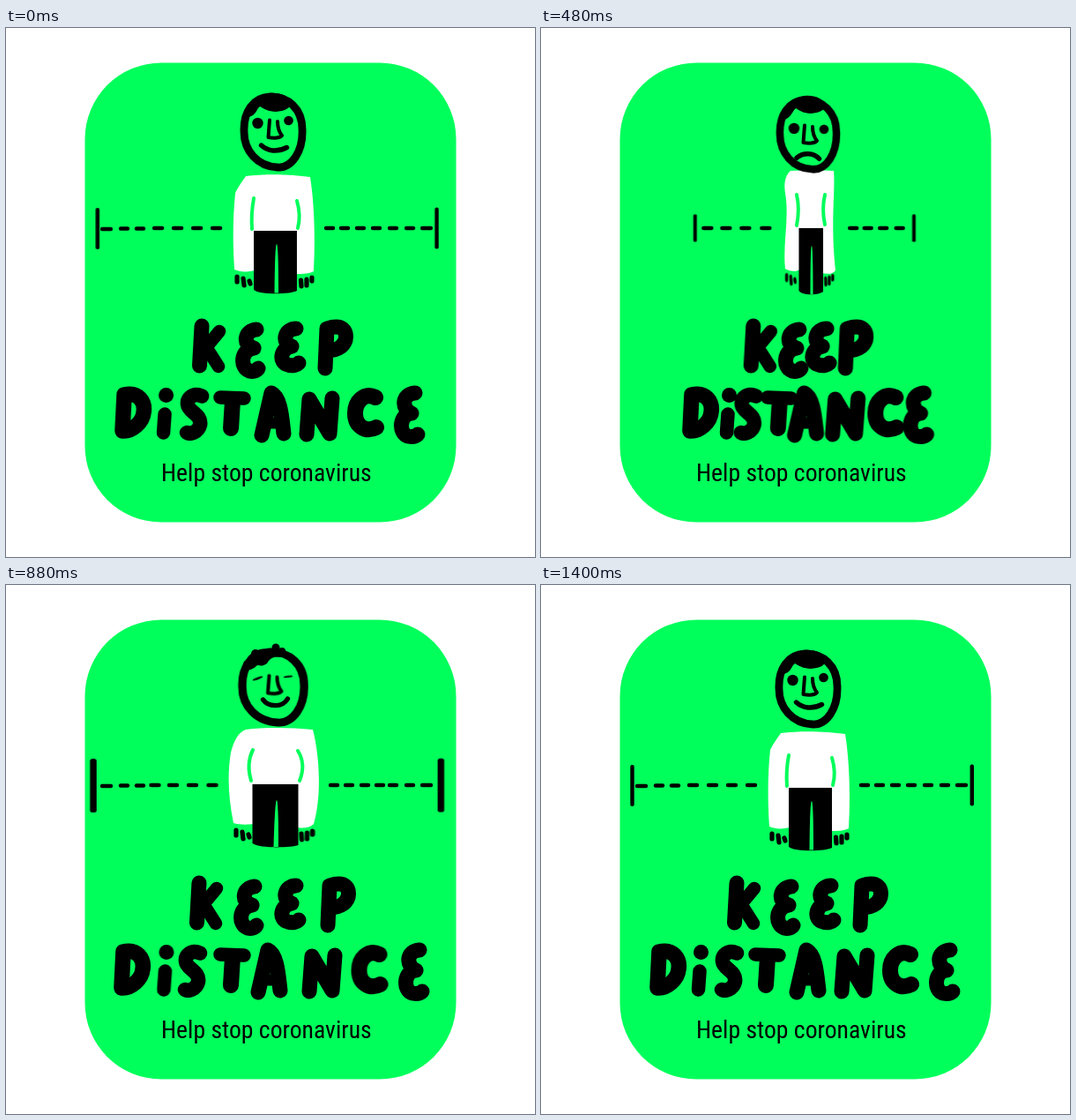
Recreate the animation shown at these times as an HTML page. Size 600x600 px, loop 1440 ms.

```html
<!DOCTYPE html>
<html lang="en">
<head>
<meta charset="utf-8">
<title>Keep distance</title>
<style>
  html, body { margin: 0; width: 100%; height: 100%; overflow: hidden; background: #fff; }
  svg { display: block; width: 100vw; height: 100vh; }

  /* Each part rests at --a, is squeezed to --b, then stretched to --c. */
  .slide, .pose, .morph, .fade {
    animation: 1440ms cubic-bezier(.333, 1, .667, 1) infinite;
  }
  .slide { animation-name: slide; }
  .pose { animation-name: pose; transform-box: fill-box; transform-origin: center; }
  .morph { animation-name: morph; d: var(--a); }
  .fade { animation-name: shrink; transform-box: fill-box; transform-origin: center; }
  .fade.far { animation-name: shrinkFast; }
  .ruler * { animation-timing-function: cubic-bezier(.333, .833, .667, 1); }
  .title .slide { animation-timing-function: cubic-bezier(.333, .6, .6, 1); }
  .face * { animation-timing-function: cubic-bezier(.6, 0, .3, 1); }

  @keyframes slide {
    0%, 72%, 100% { transform: translateX(0); }
    38.5%, 43.5% { transform: translateX(var(--b)); animation-timing-function: ease-in-out; }
    59%, 62% { transform: translateX(var(--c)); animation-timing-function: ease-in-out; }
  }
  @keyframes pose {
    0%, 72%, 100% { transform: var(--a, translate(0)); }
    38.5%, 43.5% { transform: var(--b); animation-timing-function: ease-in-out; }
    59%, 62% { transform: var(--c); animation-timing-function: ease-in-out; }
  }
  @keyframes morph {
    0%, 72%, 100% { d: var(--a); }
    38.5%, 43.5% { d: var(--b); animation-timing-function: ease-in-out; }
    59%, 62% { d: var(--c); animation-timing-function: ease-in-out; }
  }
  @keyframes shrink {
    0% { transform: scale(1); animation-timing-function: linear; }
    13%, 48% { transform: scale(0); }
    57%, 100% { transform: scale(1); }
  }
  @keyframes shrinkFast {
    0% { transform: scale(1); animation-timing-function: linear; }
    6%, 52% { transform: scale(0); }
    58%, 100% { transform: scale(1); }
  }

  .ink { fill: none; stroke: #000; stroke-linecap: round; stroke-linejoin: round; }
  .gap { fill: none; stroke: #00ff5b; stroke-width: 4; stroke-linecap: round; }
  .title { stroke-width: 17; }
  .eye { --a: translate(0, 0) rotate(0deg) scale(1, 1); }
  .tuft { --a: scale(0); --b: scale(0); --c: scale(1); }
  text {
    font: 400 27.7px "Roboto Condensed", Roboto, sans-serif;
    font-stretch: 75%;
    text-anchor: middle;
  }
</style>
</head>
<body>
<svg viewBox="0 0 600 600">
  <rect x="89.5" y="39.5" width="421" height="521" rx="86.5" fill="#00ff5b"/>

  <g class="ruler">
    <rect class="pose" x="101.3" y="204" width="4.4" height="47" rx="2"
      style="--b:translate(72px,-.5px) scale(.9,.66);--c:translate(-4.5px,0) scale(1.7,1.3)"/>
    <rect class="pose" x="486.6" y="203.5" width="4.4" height="47" rx="2"
      style="--b:translate(-66.5px,0) scale(.9,.66);--c:translate(4.5px,0) scale(1.7,1.3)"/>
    <g class="ink" stroke-width="4.4">
      <path class="fade far" d="M109 228h10"/>
      <path class="fade far" d="M130 227.5h8"/>
      <path class="fade" d="M148 227.5h8"/>
      <path class="slide" d="M168 227h9" style="--b:16.5px;--c:-3.5px"/>
      <path class="slide" d="M190 227h9" style="--b:15.5px;--c:-5px"/>
      <path class="slide" d="M212 227h9" style="--b:15.5px;--c:-5px"/>
      <path class="slide" d="M234 227h9" style="--b:16.5px;--c:-4.5px"/>
      <path class="slide" d="M363 227h8" style="--b:-13px;--c:5px"/>
      <path class="slide" d="M380 227h8" style="--b:-13.5px;--c:5px"/>
      <path class="slide" d="M398 227h8" style="--b:-14px;--c:5px"/>
      <path class="slide" d="M416 227h8" style="--b:-13.5px;--c:4px"/>
      <path class="fade" d="M435 227h8"/>
      <path class="fade far" d="M454 227h8"/>
      <path class="fade far" d="M472 227h10"/>
    </g>
  </g>

  <!-- body -->
  <path class="morph" fill="#fff" style="
    --a:path('M272 168C295 165 325 166 345 169C350 200 351 240 349 276C343 279 336 279 329 279L329 235L282 235L282 275C274 277 266 277 259 274C257 245 257 215 260 187C263 180 268 174 272 168Z');
    --b:path('M283 162C300 161 318 161 332 162C334 185 328 220 334 275C330 280 325 279 319 278L319 232L294 232L294 274C288 277 282 276 277 273C274 245 282 215 277 187C275 175 278 166 283 162Z');
    --c:path('M272 164C295 161 325 162 348 164C356 195 358 240 349 271C344 276 337 276 330 275L330 232L281 232L281 271C274 272 264 272 258 270C252 240 251 215 255 190C259 175 264 167 272 164Z')"/>
  <path class="morph" style="
    --a:path('M281 230L330 230L330 298C323 302 288 303 281 297Z');
    --b:path('M292.5 227L320 227L320 299C315 303 297 304 292.5 298Z');
    --c:path('M279.5 226L331.5 226L331.5 295C324 298 287 299 279.5 293Z')"/>
  <g class="gap">
    <path class="morph" style="
      --a:path('M281 193C279 204 278 216 279 228');
      --b:path('M290 189C293 202 292 214 290 224');
      --c:path('M280 187C274 199 275 212 278 222')"/>
    <path class="morph" style="
      --a:path('M330 196C333 206 334 216 331 227');
      --b:path('M322 189C319 202 320 214 322 223');
      --c:path('M331 188C338 199 337 212 333 222')"/>
  </g>
  <path class="morph" fill="#00ff5b" style="
    --a:path('M307 245Q309 245 309 300.5L304.5 300.5Q305 245 307 245Z');
    --b:path('M307 247Q308.5 247 308.5 302L305.5 302Q305.5 247 307 247Z');
    --c:path('M307 244Q309 244 309 297L303.5 297Q305 244 307 244Z')"/>
  <g class="ink" stroke-width="5.2">
    <path class="pose" d="M262 282V288M269 284L270 292M276 287L277 290"
      style="--b:translate(14px,-2px) scale(.65,.95);--c:translate(-1px,-4px)"/>
    <path class="pose" d="M334.5 286L335 293M341 285V292M347 283V287"
      style="--b:translate(-14px,-2px) scale(.65,.95);--c:translate(.5px,-4px)"/>
  </g>

  <!-- head -->
  <path class="ink pose" stroke-width="8.8"
    d="M299 78C320 77 336 92 336 115C337 140 324 159 308 158C285 157 270 139 270 118C269 95 280 79 299 78Z"
    style="--b:translate(0,3px) scale(.97,.98);--c:translate(0,-2px) scale(1.06,1)"/>
  <path class="morph" style="
    --a:path('M271 101C271 88 283 75 299 74C311 73 319 77 324 84C322 92 316 94 306 95C298 95 291 91 288 89C284 92 285 95 280 99C276 101 273 102 271 101Z');
    --b:path('M272 104C272 91 284 78 299 77C311 76 319 80 323 87C321 94 316 96 306 97C298 97 292 93 289 91C285 95 285 98 280 102C277 104 274 104 272 104Z');
    --c:path('M271 95C268 83 284 68 299 74C308 72 316 73 320 80C316 83 308 81 304 82C298 84 297 88 296 89C290 93 288 91 285 91C279 97 274 97 271 95Z')"/>
  <circle class="pose tuft" cx="306" cy="71" r="4.5"/>
  <circle class="pose tuft" cx="313" cy="75" r="4"/>
  <circle class="pose tuft" cx="283" cy="78" r="5"/>
  <circle class="pose tuft" cx="274" cy="90" r="5"/>
  <g class="face">
    <circle class="pose eye" cx="285.5" cy="108" r="6.2"
      style="--b:translate(1.5px,6px) rotate(0deg) scale(1,1);--c:translate(0,-2px) rotate(-20deg) scale(1,.22)"/>
    <circle class="pose eye" cx="320.5" cy="105" r="5.3"
      style="--b:translate(.5px,10px) rotate(0deg) scale(1,1);--c:translate(-.5px,-1px) rotate(-6deg) scale(1,.22)"/>
    <path class="ink pose" stroke-width="4" d="M299 104.5L297.5 124C303 125 310 125 313 122C309 117 308 112 308 106"
      style="--b:translate(0,6px);--c:translate(-.5px,-1.5px)"/>
    <path class="ink morph" stroke-width="5.4" style="
      --a:path('M289.5 133C297 140 308 141 318.5 135.5');
      --b:path('M290 147.5C297 141 309 141 315.5 148.5');
      --c:path('M291.5 130C297 138 313 140 319.5 129')"/>
  </g>

  <!-- title -->
  <g class="ink title">
    <g class="slide" style="--b:19px;--c:-3px">
      <path d="M222 338L219.5 383"/>
      <path stroke-width="14.5" d="M241 384L227 362L242 344"/>
    </g>
    <path class="slide" style="--b:9px;--c:-2px" d="M284 342C270 343 268 360 281 363C266 365 265 385 276 389C280 390 284 389 286 386"/>
    <path class="slide" style="--b:-5px;--c:0px" d="M329 341C316 341 312 357 324 361C311 363 309 380 320 382C325 384 330 382 332 380"/>
    <path class="slide" style="--b:-17px;--c:3px" d="M362 386L364 341C382 335 387 344 385 354C382 363 372 366 367 366"/>
    <path class="slide" stroke-width="17.5" style="--b:37.5px;--c:-1px" d="M132 456L134 416C150 412 158 424 156 436C155 447 143 458 132 457Z"/>
    <g class="slide" style="--b:32.5px;--c:.5px">
      <path d="M181.5 416.5h.01"/>
      <path stroke-width="15.5" d="M180 438L178.500 459"/>
    </g>
    <path class="slide" stroke-width="16.5" style="--b:22px;--c:-2px" d="M222 417.5C212 413 205 420 206 427C207 436 222 438 220 450C218 459 208 461 205 459"/>
    <g class="slide" style="--b:14px;--c:0px">
      <path stroke-width="15.5" d="M243 419L270 420"/>
      <path stroke-width="18" d="M257 422L255 454"/>
    </g>
    <g class="slide" style="--b:-2.5px;--c:-4px">
      <path d="M290 462L301 414C312 419 313 445 315 460"/>
      <path stroke-width="13" d="M296 448H312"/>
    </g>
    <path class="slide" style="--b:-10.5px;--c:3px" d="M341 461L344 421L367 460L370 420"/>
    <path class="slide" stroke-width="18" style="--b:-17px;--c:4.5px" d="M419 419C406 413 396 424 396 437C396 452 408 459 420 453"/>
    <path class="slide" style="--b:-30px;--c:5px" d="M464 414C449 415 448 432 460 437C446 438 445 460 456 463C461 464 465 463 467 461"/>
  </g>

  <text x="295.3" y="513.5">Help stop coronavirus</text>
</svg>
</body>
</html>
```
